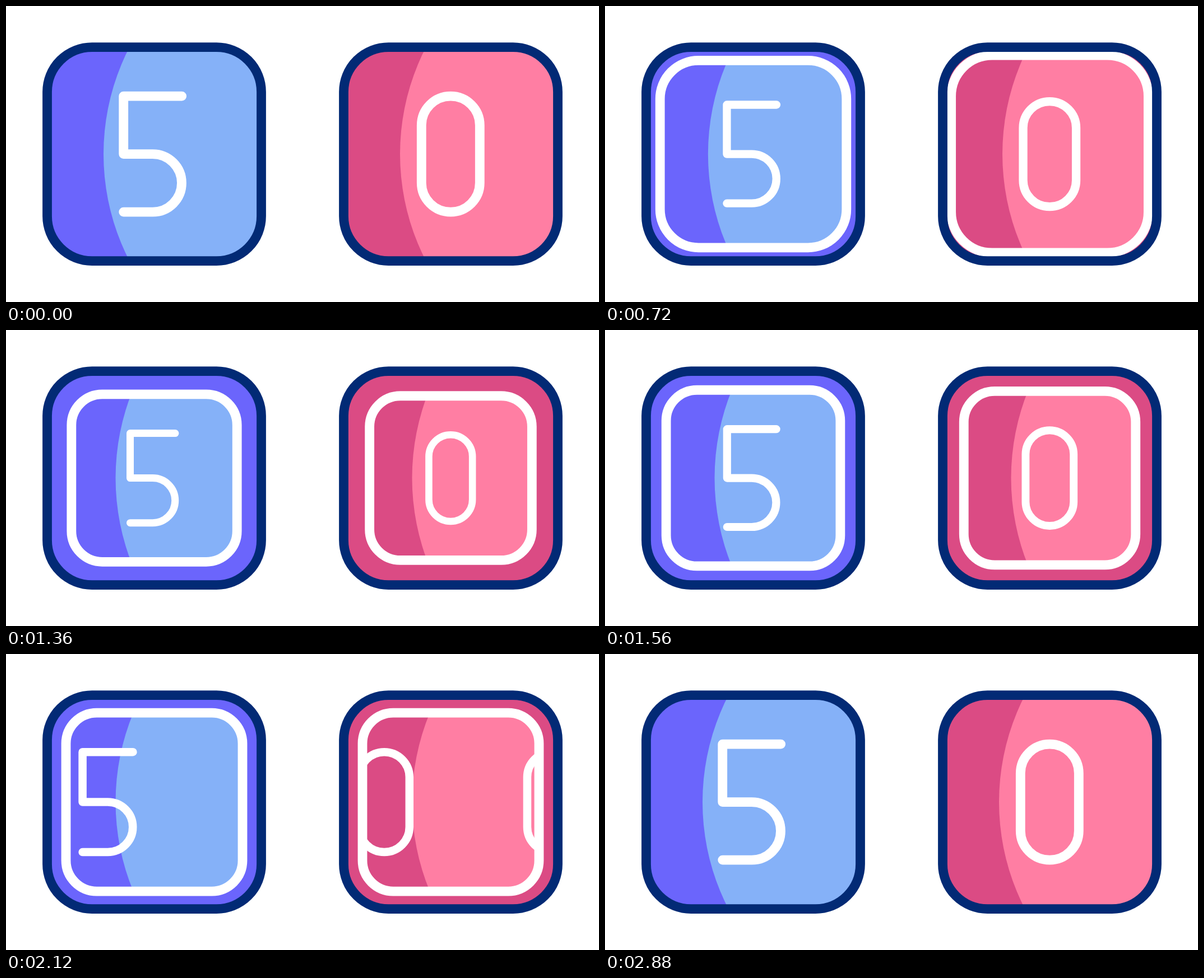
Recreate the animation shown at these times as an HTML page with a canvas. Size 1058 by 529 pixels, loop 3000 ms.

```html
<!DOCTYPE html>
<html lang="en">
<head>
<meta charset="utf-8">
<title>Score cards</title>
<style>
  html, body { margin: 0; width: 100%; height: 100%; overflow: hidden; background: #fff; }
  canvas { display: block; }
</style>
</head>
<body>
<canvas id="stage" width="1058" height="529"></canvas>
<script>
const ctx = document.getElementById('stage').getContext('2d');

const LOOP = 3000, STEP = 40;
const NAVY = '#022a75';
const STROKE = 16.8;
const ARC = 418;        // radius of the light area's edge
const TRAVEL = 300;     // distance between two copies of a sliding digit

const cards = [
  { x: 264.5, lag: 0, dark: '#6b65fc', light: '#85b1f8', digit: five, digitX: -2.8 },
  { x: 793.5, lag: 65, dark: '#db4b84', light: '#ff7ea3', digit: zero, digitX: -0.2 }
];

function ease(time, start, end) {
  const u = Math.min(1, Math.max(0, (time - start) / (end - start)));
  return u * u * (3 - 2 * u);
}

const mix = (a, b, u) => a + (b - a) * u;

function five() {
  ctx.moveTo(52, -103.5);
  ctx.lineTo(-52, -103.5);
  ctx.lineTo(-52, 0);
  ctx.lineTo(0, 0);
  ctx.arc(0, 51.75, 51.75, -Math.PI / 2, Math.PI / 2);
  ctx.lineTo(-52, 103.5);
}

function zero() {
  ctx.roundRect(-52, -103.5, 104, 207, 52);
}

function box(width, height, radius) {
  ctx.beginPath();
  ctx.roundRect(-width / 2, -height / 2, width, height, radius);
}

function outline(color) {
  ctx.strokeStyle = color;
  ctx.lineWidth = STROKE;
  ctx.stroke();
}

function drawDigit(card, offset, scale) {
  ctx.save();
  ctx.translate(card.digitX + offset, 0);
  ctx.scale(scale, scale);
  ctx.beginPath();
  card.digit();
  outline('#fff');
  ctx.restore();
}

function drawCard(card, now) {
  const time = now - card.lag;
  const shrink = ease(time, 470, 1000);
  const rise = ease(time, 1000, 1700);
  const grow = ease(time, 2310, 2805);
  const slide = TRAVEL * ease(time, 1643, 2365);

  // Full size, then a deep pinch, then a resting size, then back.
  const size = (full, pinched, rest) =>
    mix(mix(mix(full, pinched, shrink), rest, rise), full, grow);
  const inset = shrink * (1 - grow);
  const width = size(382, 274, 315);
  const height = width + 4 * inset;
  const radius = mix(80, 55, inset);
  const edge = mix(-90.5, -69, inset);
  const scale = size(1, 0.675, 0.864);

  ctx.save();
  ctx.translate(card.x, 264.6);
  box(382, 382, 80);
  ctx.fillStyle = card.dark;
  ctx.fill();

  ctx.save();
  box(382, 382, 80);
  ctx.clip();
  ctx.save();
  box(width, height, radius);
  ctx.clip();
  ctx.beginPath();
  ctx.arc(edge + ARC, 0, ARC, 0, Math.PI * 2);
  ctx.fillStyle = card.light;
  ctx.fill();
  drawDigit(card, slide, scale);
  if (slide > 0) drawDigit(card, slide - TRAVEL, scale);
  ctx.restore();
  if (inset > 0) {
    box(width, height, radius);
    outline('#fff');
  }
  ctx.restore();

  box(382, 382, 80);
  outline(NAVY);
  ctx.restore();
}

function draw(time) {
  ctx.fillStyle = '#fff';
  ctx.fillRect(0, 0, 1058, 529);
  ctx.lineCap = ctx.lineJoin = 'round';
  const now = Math.floor((time % LOOP) / STEP) * STEP;
  for (const card of cards) drawCard(card, now);
}

const begin = performance.now();
function frame() {
  draw(performance.now() - begin);
  requestAnimationFrame(frame);
}
frame();
</script>
</body>
</html>
```
